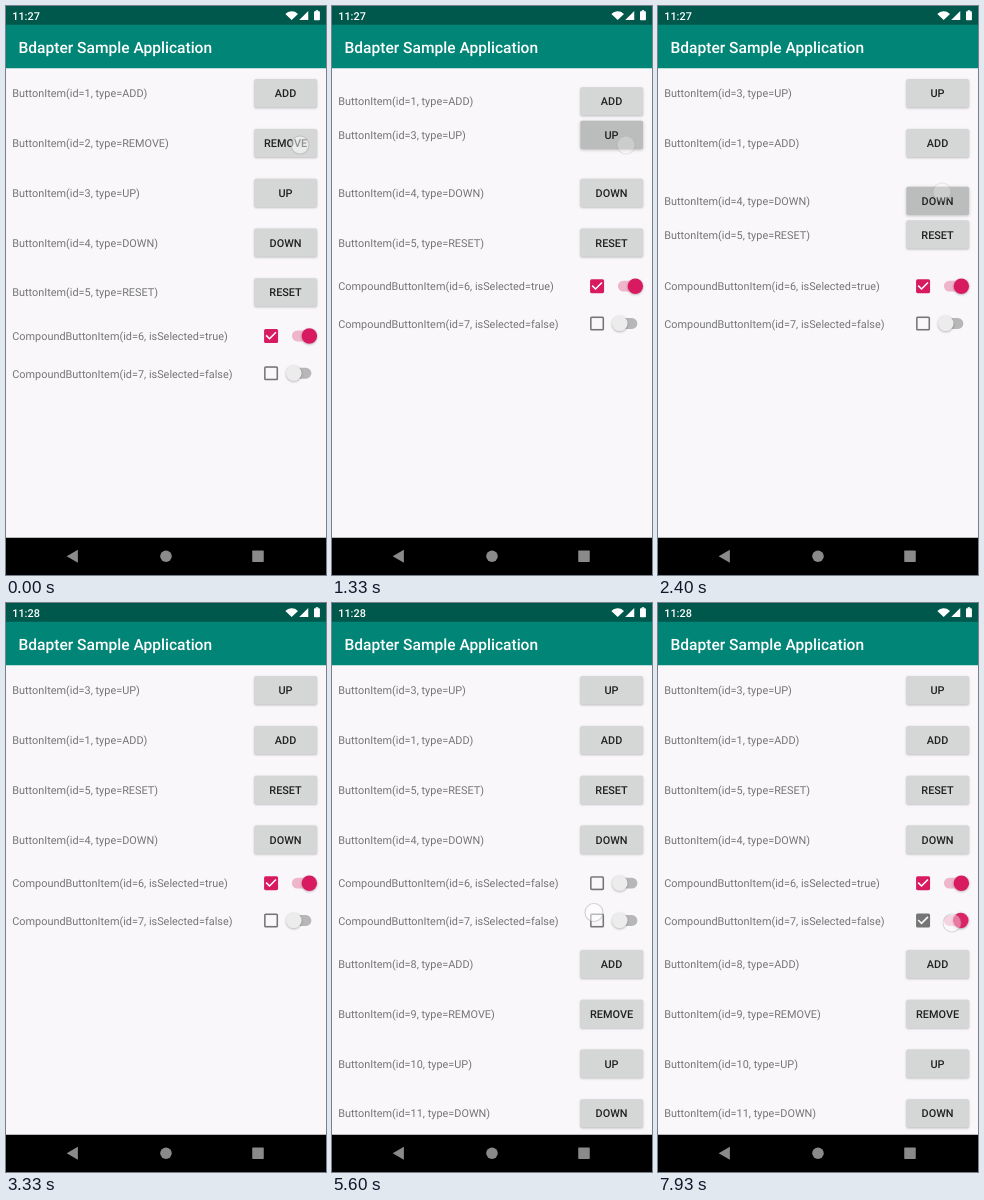
Recreate the animation shown at these times as an HTML page with a canvas. Size 320 by 569 pixels, loop 8 s.

```html
<!DOCTYPE html>
<html lang="en">
<head>
<meta charset="utf-8">
<title>Bdapter Sample Application</title>
<style>
html, body { margin: 0; height: 100%; overflow: hidden; background: #f9f7fa; }
canvas { display: block; width: 320px; height: 569px; }
</style>
</head>
<body>
<canvas id="stage"></canvas>
<script>
const canvas = document.getElementById('stage');
const ctx = canvas.getContext('2d');
const ratio = Math.max(1, window.devicePixelRatio || 1);
canvas.width = 320 * ratio;
canvas.height = 569 * ratio;

const LOOP = 8000, DP = 7 / 9; // all lengths below are in dp
const ACCENT = '#d81b60', GREY = '#757575', PAPER = '#f9f7fa';
const CHECK_X = 340.8, SWITCH_X = 370;

// Touch points are in stage pixels; id and part name the pressed control.
const taps = [
  { x: 294, y: 139, down: -60, up: 235, id: 2, part: 'button' },
  { x: 294, y: 139, down: 1015, up: 1250, id: 3, part: 'button' },
  { x: 284, y: 186, down: 2085, up: 2320, id: 4, part: 'button' },
  { x: 291, y: 140, down: 3570, up: 3810, id: 1, part: 'button' },
  { x: 264, y: 281, down: 4590, up: 4740, id: 6, part: 'check' },
  { x: 262, y: 309.5, down: 5590, up: 5740, id: 7, part: 'check' },
  { x: 304, y: 280, down: 6740, up: 6890, id: 6, part: 'switch' },
  { x: 294, y: 320, down: 7800, up: 7895, id: 7, part: 'switch' }
];
const types = ['ADD', 'REMOVE', 'UP', 'DOWN', 'RESET'];

const ramp = (t, start, length) => Math.min(1, Math.max(0, (t - start) / length));
const ease = (t, start) => (1 - Math.cos(Math.PI * ramp(t, start, 250))) / 2;

function pressure(t, id, part) {
  return taps.filter(p => p.id === id && p.part === part).reduce((sum, p) =>
    sum + ramp(t, p.down + 120, 100) * (1 - ramp(t, p.up + 90, 300)), 0);
}

// y is the middle of the line box, font padding included
function text(str, x, y, size, color, weight = 400, align = 'left') {
  ctx.font = `${weight} ${size}px Roboto, sans-serif`;
  ctx.textRendering = 'geometricPrecision';
  ctx.textAlign = align;
  ctx.fillStyle = color;
  ctx.fillText(str, x, y + size * 0.3925);
}

function rect(x, y, w, h, color, radius = 0) {
  ctx.beginPath();
  ctx.roundRect(x, y, w, h, radius);
  ctx.fillStyle = color;
  ctx.fill();
}

function disc(x, y, r, color) {
  ctx.beginPath();
  ctx.arc(x, y, r, 0, 7);
  ctx.fillStyle = color;
  ctx.fill();
}

function polygon(color, ...points) {
  ctx.beginPath();
  points.forEach(p => ctx.lineTo(...p));
  ctx.fillStyle = color;
  ctx.fill();
}

function withShadow(blur, drop, alpha, draw) {
  ctx.save();
  ctx.shadowColor = `rgba(0,0,0,${alpha})`;
  ctx.shadowBlur = blur * DP * ratio;
  ctx.shadowOffsetY = drop * DP * ratio;
  draw();
  ctx.restore();
}

function withAlpha(alpha, draw) {
  if (alpha <= 0) return;
  ctx.save();
  ctx.globalAlpha *= alpha;
  draw();
  ctx.restore();
}

function buttonRow(t, id, type, y, alpha = 1) {
  withAlpha(alpha, () => {
    text(`ButtonItem(id=${id}, type=${type})`, 8, y, 14, GREY);
    const press = pressure(t, id, 'button');
    withShadow(3 + press, 1, 0.26, () => rect(319.4, y - 18, 80.4, 36.4, '#d5d6d6', 2));
    rect(319.4, y - 18, 80.4, 36.4, `rgba(0,0,0,${0.12 * press})`, 2);
    text(type, 359.4, y, 14, '#202020', 500, 'center');
  });
}

function ripple(x, y, press) {
  if (press > 0) disc(x, y, 12 + 8 * press, `rgba(0,0,0,${0.11 * press})`);
}

function checkBox(y, selected, on) {
  const x = CHECK_X, hole = 7 * (1 - on);
  rect(x - 9, y - 9, 18, 18, selected ? ACCENT : GREY, 2);
  rect(x - hole, y - hole, 2 * hole, 2 * hole, PAPER);
  withAlpha(on, () => {
    ctx.beginPath();
    ctx.moveTo(x - 6.3, y - 0.7);
    ctx.lineTo(x - 2, y + 3.6);
    ctx.lineTo(x + 6.3, y - 4.7);
    ctx.strokeStyle = '#fff';
    ctx.lineWidth = 2;
    ctx.stroke();
  });
}

function toggle(y, on) {
  const x = SWITCH_X + 20 * on;
  withAlpha(1 - on, () => rect(367.6, y - 7, 25, 14, '#b7b6b8', 7));
  withAlpha(on, () => rect(367.6, y - 7, 25, 14, '#efb5cb', 7));
  withShadow(3, 1, 0.3, () => disc(x, y, 10, '#ececec'));
  withAlpha(on, () => disc(x, y, 10, ACCENT));
}

function compoundRow(t, id, y, selected, on) {
  text(`CompoundButtonItem(id=${id}, isSelected=${selected})`, 8, y, 14, GREY);
  ripple(CHECK_X, y, pressure(t, id, 'check'));
  ripple(SWITCH_X + 20 * on, y, pressure(t, id, 'switch'));
  checkBox(y, selected, on);
  toggle(y, on);
}

function list(t) {
  const close = ease(t, 369), up = ease(t, 1265), down = ease(t, 2335);
  const slots = [up, 1, 2 - close - up, 3 - close + down, 4 - close - down];
  slots.forEach((slot, i) =>
    buttonRow(t, i + 1, types[i], 112 + 64 * slot, i === 1 ? 1 - ramp(t, 249, 120) : 1));

  const y = 424.2 - 64 * close;
  compoundRow(t, 6, y, t < 4750 || t >= 6900, 1 - ease(t, 4750) + ease(t, 6900));
  compoundRow(t, 7, y + 48, t >= 5750 && t < 7900, ease(t, 5750) - ease(t, 7900));

  for (let i = 0; i < 4; i++) buttonRow(t, 8 + i, types[i], 464 + 64 * i, ramp(t, 3840, 120));
}

function bars(t) {
  rect(0, 0, 412, 80, '#008577');
  rect(0, 0, 412, 24, '#00574b');
  text('Bdapter Sample Application', 16, 52, 20, '#fff', 500);
  text(t < 2600 ? '11:27' : '11:28', 8, 12, 14, '#fff', 500);

  // wifi, signal, battery
  ctx.beginPath();
  ctx.moveTo(367.3, 18);
  ctx.arc(367.3, 18, 11.2, -Math.PI * 0.76, -Math.PI * 0.24);
  ctx.fillStyle = '#fff';
  ctx.fill();
  polygon('#fff', [377, 18], [388.6, 18], [388.6, 6.4]);
  rect(396, 6.8, 7.6, 11.4, '#fff', 1);
  rect(398.2, 5.4, 3.2, 2, '#fff');

  rect(0, 683.6, 412, 49, '#000');
  polygon('#8a8a8a', [78, 707.4], [92.4, 699], [92.4, 715.8]);
  disc(205.7, 707.4, 7.4, '#8a8a8a');
  rect(316.6, 700, 14.8, 14.8, '#8a8a8a', 1);
}

function spots(t) {
  taps.filter(p => t >= p.down).forEach(p => withAlpha(1 - ramp(t, p.up, 160), () => {
    disc(p.x / DP, p.y / DP, 11.6, 'rgba(255,255,255,.5)');
    ctx.strokeStyle = 'rgba(150,145,148,.4)';
    ctx.lineWidth = 1.4;
    ctx.stroke();
  }));
}

function frame(now) {
  const t = now % LOOP;
  ctx.setTransform(ratio * DP, 0, 0, ratio * DP, 0, 0);
  rect(0, 0, 412, 732, PAPER);
  list(t);
  bars(t);
  spots(t);
  requestAnimationFrame(frame);
}
requestAnimationFrame(frame);
</script>
</body>
</html>
```
